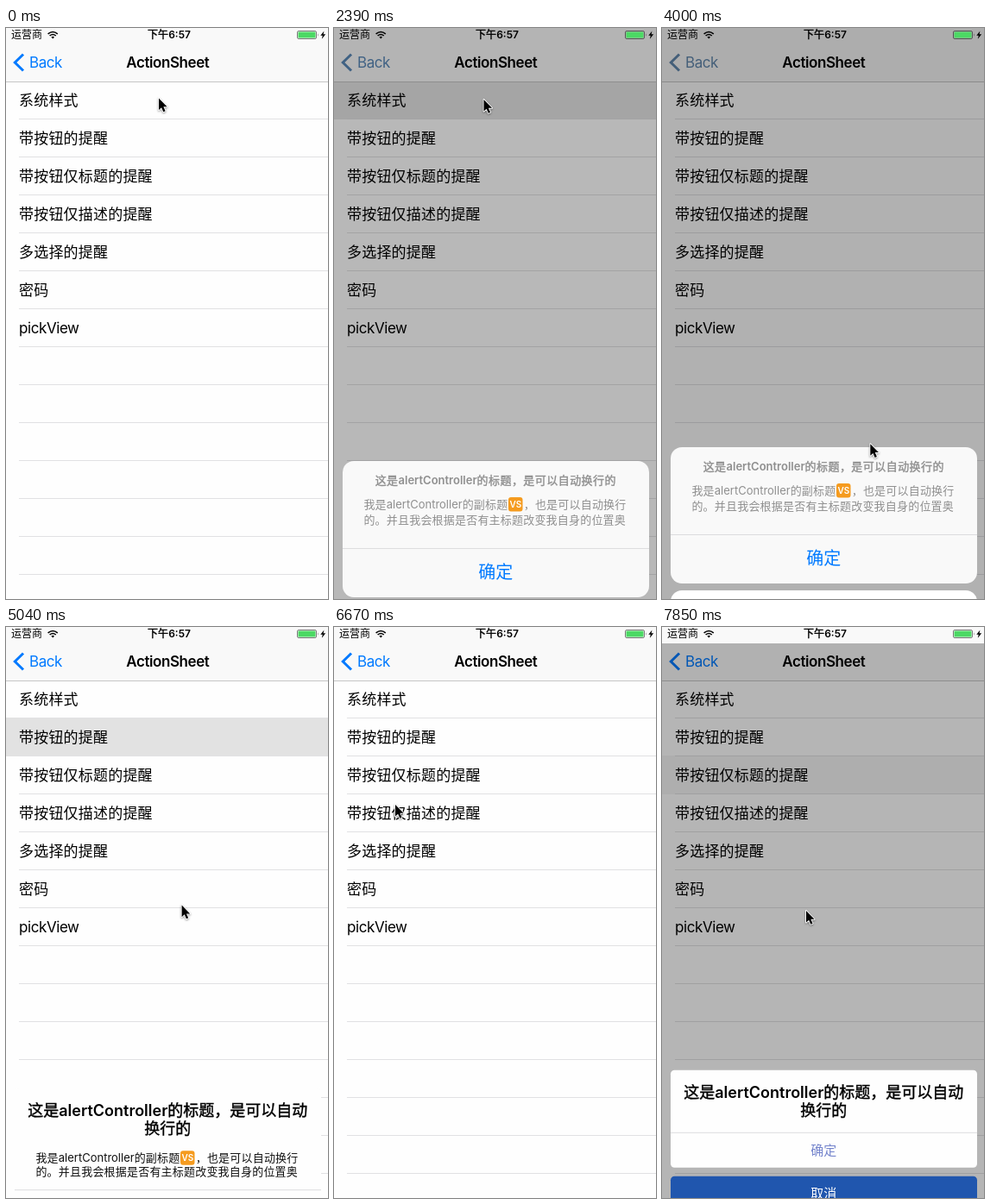
Write an HTML page that moves like this. It is 373 by 662 pixels and loops after 8 s.

```html
<!DOCTYPE html>
<html lang="zh-CN">
<head>
<meta charset="utf-8">
<title>ActionSheet</title>
<style>
  html, body { margin: 0; width: 100%; height: 100%; overflow: hidden; background: #fff; }
  svg { display: block; width: 373px; height: 662px; }
  text {
    font-family: Inter, "Noto Sans CJK SC", "Noto Sans CJK", sans-serif;
    letter-spacing: .2px; white-space: pre; fill: currentColor;
  }
  .mid { text-anchor: middle; }
  .bold { stroke: currentColor; stroke-width: .4px; letter-spacing: .45px; }
  .latin { letter-spacing: 0; stroke: none; }
  .bold .latin { font-weight: 600; }
  .tight { letter-spacing: 0; }
  .ui, .ui .latin { letter-spacing: -.42px; }
  #back path { fill: none; stroke: currentColor; stroke-width: 3; }
</style>
</head>
<body>
<svg viewBox="0 0 373 662" xmlns="http://www.w3.org/2000/svg">
  <rect width="373" height="662" fill="#fefefe"/>
  <rect id="highlight" width="373" height="45" fill="#d9d9d9"/>
  <g id="table"></g>
  <rect width="373" height="62" fill="#f9f9f9"/>
  <rect y="62" width="373" height="1" fill="#c6c6c6"/>
  <g id="bar"></g>
  <g id="back"><path d="M20 30.5 10.3 40 20 49.5"/></g>
  <g fill="none" stroke="#000" stroke-width="1.6">
    <path d="M48.6 6.9q5.6-4.8 11.2 0M50.6 9q3.6-3 7.2 0"/>
    <path d="M52.4 10.5q1.8-1.3 3.6 0l-1.8 1.9z" fill="#000" stroke="none"/>
  </g>
  <rect x="337.5" y="3.5" width="22" height="9" rx="1.6" fill="none" stroke="#777"/>
  <path d="M361 6.3q1.4 1.7 0 3.4z" fill="#777"/>
  <path d="M368.4 3.5 364.3 8.7h2.5l-1 4 4.4-5.4h-2.6z"/>
  <rect id="dim" width="373" height="662"/>
  <rect x="338.5" y="4.5" width="20" height="7" rx=".6" fill="#4cd964"/>
  <g id="sheets"></g>
  <path id="cursor" d="M0 0v13.6l3.1-2.9 2.2 5 2.3-1-2.2-4.9h4.2z"
        stroke="#fff" stroke-width="1.8" paint-order="stroke" stroke-linejoin="round"
        style="filter:drop-shadow(0 1px 1px #0006)"/>
</svg>
<script>
const $ = id => document.getElementById(id);
const LOOP = 8000, CENTER = 187.3;

// Text centred vertically on `mid`
const label = (str, x, mid, size, cls = '', color = 'inherit') => {
  const body = str.replace(/[\w:]*[A-Za-z0-9]/g, '<tspan class="latin">$&</tspan>');
  return `<text x="${x}" y="${mid + size * .37}" font-size="${size}" class="${cls}" color="${color}">${body}</text>`;
};
const box = (y, h, r, fill) => `<rect x="10" y="${y}" width="355" height="${h}" rx="${r}" fill="${fill}"/>`;
const divider = y => `<rect x="10" y="${y}" width="355" height="1" fill="#dcdcde"/>`;

const message = (y, gap, color) =>
  label('我是alertController的副标题', 34.4, y, 13, '', color) +
  `<rect x="202" y="${y - 8}" width="16.5" height="16.5" rx="3" fill="#f59b1f"/>` +
  label('VS', 210.3, y + .3, 10, 'mid bold tight', '#fff') +
  label('，也是可以自动换行', 219.7, y, 13, '', color) +
  label('的。并且我会根据是否有主标题改变我自身的位置奥', 34.4, y + gap, 13, '', color);

const bigTitle =
  label('这是alertController的标题，是可以自动', CENTER, 26, 18, 'mid bold tight') +
  label('换行的', CENTER, 47, 18, 'mid bold tight');

const flatSheet = (extra, height, okColor, cancelColor) =>
  box(0, height, 4.5, '#fefefe') + bigTitle + extra + divider(height - 41) +
  label('确定', CENTER, height - 20, 15, 'mid tight', okColor) +
  box(height + 10, 40, 4.5, cancelColor) +
  label('取消', CENTER, height + 30, 15, 'mid tight', '#fff');

const systemSheet =
  box(0, 158, 13, '#f9f9f9') +
  label('这是alertController的标题，是可以自动换行的', CENTER, 22, 13, 'mid bold', '#8f8f8f') +
  message(50, 18, '#8f8f8f') + divider(101) +
  label('确定', CENTER, 129, 20, 'mid tight', '#007aff') +
  box(166, 57, 13, '#fff') +
  label('取消', CENTER, 194, 20, 'mid bold tight', '#007aff');

const titles = ['系统样式', '带按钮的提醒', '带按钮仅标题的提醒', '带按钮仅描述的提醒', '多选择的提醒', '密码', 'pickView'];
$('table').innerHTML = Array.from({ length: 13 }, (_, i) =>
  `<rect x="15" y="${105 + 44 * i}" width="358" height="1" fill="#e1e1e3"/>` +
  label(titles[i] || '', 15, 84 + 44 * i, 17, i === 6 ? 'ui' : '')).join('');
$('bar').innerHTML =
  label('运营商', 6, 8, 12, 'tight') +
  label('下午6:57', 189, 8, 12, 'mid bold tight') +
  label('ActionSheet', CENTER, 40, 17, 'mid bold ui');
$('back').innerHTML += label('Back', 27, 40, 17, 'ui');
$('sheets').innerHTML = [
  systemSheet,
  flatSheet(message(81, 16, '#111'), 159, '#dd4a24', '#962838'),
  flatSheet('', 113, '#7484cc', '#2056ae')
].map(s => `<g>${s}</g>`).join('');

const clamp = v => Math.max(0, Math.min(1, v));

// Evenly spaced refreshes: [first, last, count]; the picture holds in between
const bursts = [[0, 1800, 4], [2240, 3560, 10], [3850, 5930, 15], [6220, 6970, 6], [7270, 7850, 5]];
function heldTime(now) {
  const [first, last, count] = bursts.findLast(b => b[0] <= now);
  const step = (last - first) / (count - 1);
  return first + step * Math.min(count - 1, Math.floor((now - first) / step));
}

// Sheets rise with exponential decay and leave accelerating
const TRAVEL = 232;
const dropAt = (s, t) => t < s.open ? TRAVEL : Math.min(TRAVEL,
  TRAVEL * Math.exp((s.open - t) / 104) + TRAVEL * clamp((t - s.close) / 308) ** 2);
const pressAt = (s, t) => t < s.open - 60 ? 0 : clamp(1 - (t - s.open - 30) / 300);

const systemDim = drop => .4 * (1 - drop / TRAVEL);
const flatDim = drop => .31 * clamp(1 - (drop / 88) ** 2);
const sheets = [
  { open: 2262, close: 3850, rest: 432, dim: systemDim, dimTop: 0 },
  { open: 4938, close: 6220, rest: 446, dim: flatDim, dimTop: 0 },
  { open: 7604, close: LOOP, rest: 492, dim: flatDim, dimTop: 19 }
];

// Places the pointer visits: [time, x, y]
const stops = [
  [0, 177, 81.5], [2390, 173.5, 83], [3270, 222.5, 528], [3850, 223, 559], [4000, 241.5, 481.5],
  [4740, 125, 130], [5040, 204, 323.5], [5930, 213.5, 588.5], [6220, 213.5, 588.5],
  [6670, 71, 206], [7500, 84, 172], [7850, 167, 329]
];
function cursorAt(t) {
  const i = Math.min(stops.findLastIndex(s => s[0] <= t), stops.length - 2);
  const [a, b] = [stops[i], stops[i + 1]];
  const k = clamp((t - a[0]) / (b[0] - a[0]));
  return [1, 2].map(j => a[j] + (b[j] - a[j]) * k);
}

function draw(t) {
  const drops = sheets.map(s => dropAt(s, t));
  drops.forEach((drop, i) => {
    const node = $('sheets').children[i];
    node.style.display = drop < TRAVEL ? '' : 'none';
    node.setAttribute('transform', `translate(0 ${sheets[i].rest + drop})`);
  });

  const open = sheets.find((s, i) => drops[i] < TRAVEL);
  $('dim').setAttribute('y', open ? open.dimTop : 0);
  $('dim').setAttribute('opacity', open ? open.dim(drops[sheets.indexOf(open)]) : 0);

  const row = sheets.findIndex(s => pressAt(s, t) > 0);
  $('highlight').setAttribute('opacity', row < 0 ? 0 : pressAt(sheets[row], t));
  $('highlight').setAttribute('y', 61 + 44 * row);

  const gray = 100 * (1 - drops[0] / TRAVEL);
  $('back').style.color = `color-mix(in srgb, rgb(128 140 150) ${gray}%, #007aff)`;
  $('cursor').setAttribute('transform', `translate(${cursorAt(t)})`);
}

const start = performance.now();
function loop() {
  draw(heldTime((performance.now() - start) % LOOP));
  requestAnimationFrame(loop);
}
loop();
</script>
</body>
</html>
```
